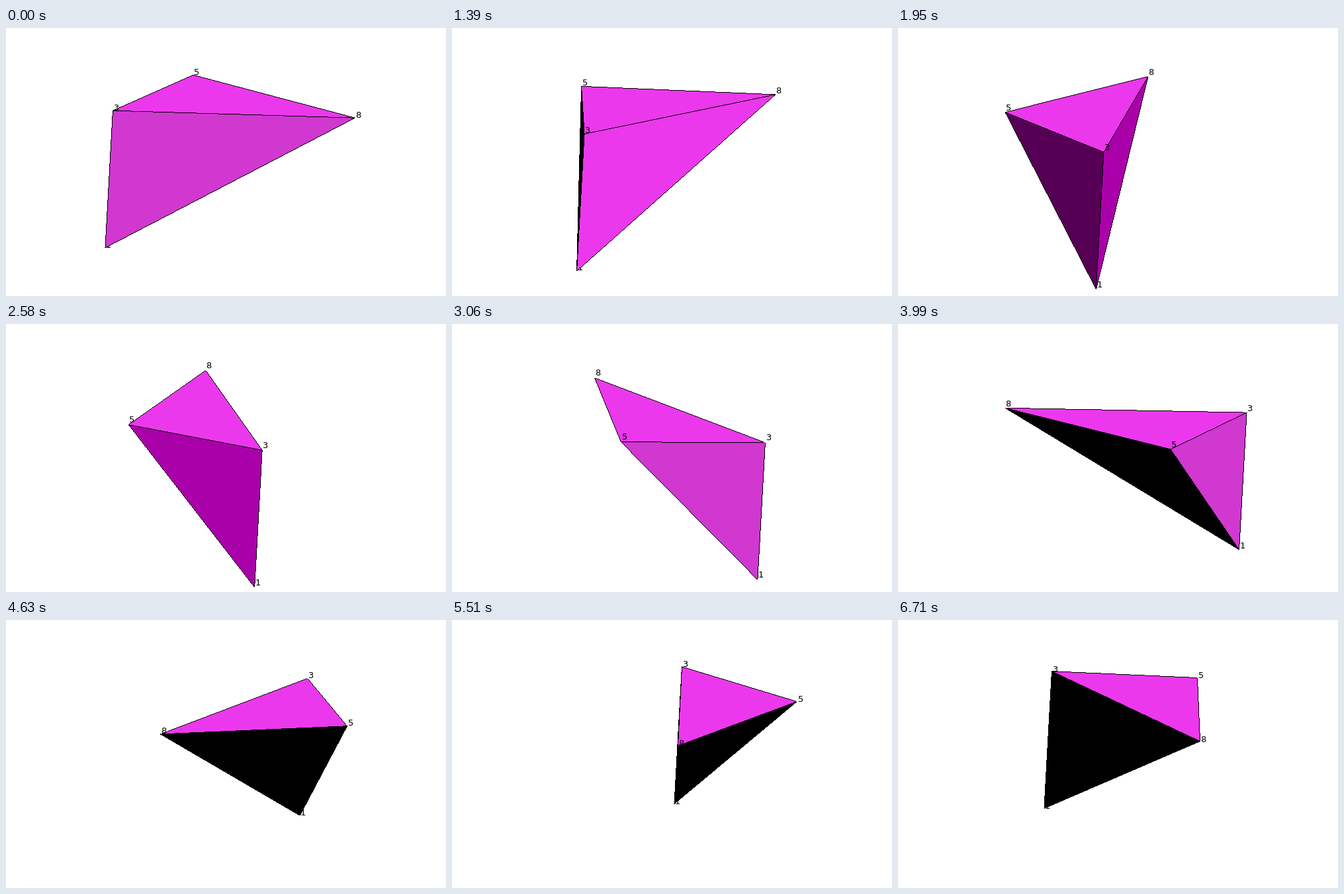
An HTML page that plays this animation: 665x406 px, repeating every 7.9 s.

```html
<!DOCTYPE html>
<html lang="en">
<head>
<meta charset="utf-8">
<title>Rotating tetrahedron</title>
<style>
html, body { margin: 0; width: 100%; height: 100%; overflow: hidden; background: #fff; }
svg { display: block; width: 665px; height: 406px; }
polygon, path { shape-rendering: crispEdges; }
text { font: 13px "DejaVu Sans", sans-serif; fill: #000; }
</style>
</head>
<body>
<svg viewBox="0 0 665 406">
  <text id="n1">1</text>
  <g transform="translate(.5 .5)">
    <g id="left"><polygon/><path/></g>
    <g id="right"><polygon/><path/></g>
    <g id="back"><polygon/><path/></g>
    <g id="top"><polygon/><path/></g>
  </g>
  <text id="n3">3</text><text id="n5">5</text><text id="n8">8</text>
</svg>
<script>
const LOOP = 7900, STEP = 40, RAD = Math.PI / 180, START = 175.6;
const $ = id => document.getElementById(id);

// bend < 0 slows towards the end of a drag, bend > 0 speeds up
const drags = [
  { at: 950, steps: 31, turn: 84.5, bend: -.65 },
  { at: 2380, steps: 24, turn: 62.4, bend: 0 },
  { at: 3510, steps: 29, turn: 82.4, bend: .45 },
  { at: 4950, steps: 19, turn: 49.7, bend: .55 },
  { at: 6030, steps: 14, turn: 24.8, bend: 0 },
  { at: 6710, steps: 1, turn: .5, bend: 0 }
];

function angleAt(t) {
  return drags.reduce((angle, { at, steps, turn, bend }) => {
    const done = Math.floor((t - at) / STEP) + 1;
    const u = Math.min(1, Math.max(0, done / steps));
    return angle - turn * (u - bend * u ** 3 * (1 - u));
  }, START);
}

// Point on the tilted ellipse traced by the upper corners
function rim(deg) {
  const x = 183.6 * Math.cos(deg * RAD), y = 59.9 * Math.sin(deg * RAD);
  return [344 + .9985 * x - .0552 * y, 130.2 + .0552 * x + .9985 * y];
}

// Lambert light reduced to a few shades
function shade(normal) {
  const v = Math.cos((normal - 60) * RAD);
  return v > .94 ? '#ec38ec' : v > .76 ? '#d038d0' : v > .54 ? '#aa00aa' : v > .18 ? '#550055' : '#000';
}

// Line exactly one pixel thick across its longer direction
function edge([ax, ay], [bx, by]) {
  const flat = Math.abs(bx - ax) > Math.abs(by - ay);
  const dx = flat ? 0 : .5, dy = flat ? .5 : 0;
  return `M${ax - dx} ${ay - dy}L${bx - dx} ${by - dy}L${bx + dx} ${by + dy}L${ax + dx} ${ay + dy}Z`;
}

function face(id, [a, b, c], fill) {
  const facing = (b[0] - a[0]) * (c[1] - a[1]) - (b[1] - a[1]) * (c[0] - a[0]) > 0;
  const [area, outline] = $(id).children;
  $(id).style.display = facing ? '' : 'none';
  area.setAttribute('points', [a, b, c].join(' '));
  area.setAttribute('fill', fill);
  outline.setAttribute('d', edge(a, b) + edge(b, c) + edge(c, a));
}

function label(id, [x, y], dy) {
  $(id).setAttribute('x', Math.round(x + 1.7));
  $(id).setAttribute('y', Math.round(y + dy));
}

function draw() {
  const turn = angleAt(performance.now() % LOOP);
  const p3 = rim(turn), p5 = rim(turn + 73.74), p8 = rim(turn + 180);
  const p1 = [p3[0] - 11.5, p3[1] + 207.8];

  face('top', [p3, p5, p8], '#ec38ec');
  face('left', [p1, p5, p3], shade(turn + 36.87));
  face('right', [p1, p3, p8], shade(turn - 90));
  face('back', [p1, p8, p5], '#000');

  // Labels sway slightly with the turn
  const dy = -.8 - 2.2 * Math.cos((turn - 55) * RAD);
  label('n1', p1, dy);
  label('n3', p3, dy);
  label('n5', p5, dy);
  label('n8', p8, dy);
  requestAnimationFrame(draw);
}
draw();
</script>
</body>
</html>
```
